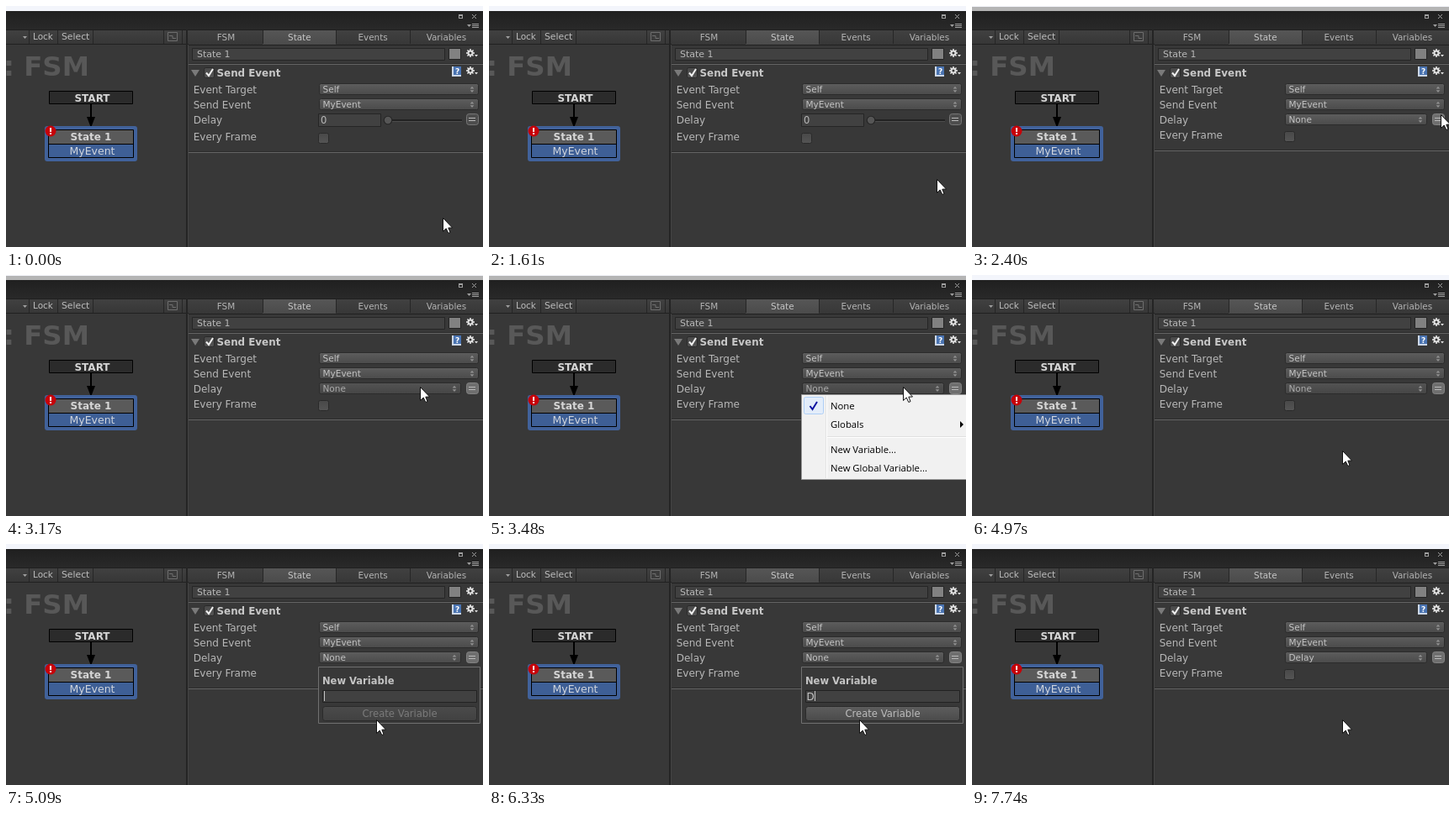
An HTML page with a canvas that plays this animation: 567 by 287 pixels, repeating every 8000 ms.

```html
<!DOCTYPE html>
<html lang="en">
<head>
<meta charset="utf-8">
<title>State inspector</title>
<style>
  html, body { margin: 0; width: 100%; height: 100%; overflow: hidden; background: #383838; }
  canvas { display: block; width: 567px; height: 287px; }
</style>
</head>
<body>
<canvas id="stage"></canvas>
<script>
const W = 567, H = 287, LOOP = 8000;
const canvas = document.getElementById('stage');
const ctx = canvas.getContext('2d');
const dpr = window.devicePixelRatio || 1;
canvas.width = W * dpr;
canvas.height = H * dpr;

const UI = '"DejaVu Sans", sans-serif';
const MENU = '"Open Sans", "Noto Sans", sans-serif';

// [time, x, y] of the pointer's top left corner
const pointerPath = [
  [0, 519, 252], [1470, 521, 248], [1610, 532, 206], [1730, 544, 160],
  [1880, 556, 136], [2030, 557, 129], [2680, 540, 131], [2800, 508, 133],
  [2920, 492, 133], [3780, 480, 161], [3905, 452, 192], [4030, 440, 210],
  [4170, 440, 213], [4420, 440, 211], [4570, 440, 209]
];
// [time, typed text]
const typing = [[5090, ''], [6330, 'D'], [6580, 'Del'], [6730, 'Dela'], [7290, 'Delay']];

const at = (list, t) => list.reduce((cur, step) => step[0] <= t ? step : cur, list[0]);
const within = (t, a, b) => t >= a && t < b;

function rect(x, y, w, h, fill) {
  ctx.fillStyle = fill;
  ctx.fillRect(x, y, w, h);
}

function shade(y, h, top, bottom) {
  const g = ctx.createLinearGradient(0, y, 0, y + h);
  g.addColorStop(0, top);
  g.addColorStop(1, bottom);
  return g;
}

function box(x, y, w, h, fill, line, r = 0) {
  ctx.beginPath();
  ctx.roundRect(x + .5, y + .5, w - 1, h - 1, r);
  ctx.fillStyle = fill;
  ctx.fill();
  ctx.strokeStyle = line;
  ctx.lineWidth = 1;
  ctx.stroke();
}

function poly(points, fill) {
  ctx.beginPath();
  points.forEach(([x, y]) => ctx.lineTo(x, y));
  ctx.closePath();
  ctx.fillStyle = fill;
  ctx.fill();
}

function line(points, color, width) {
  ctx.beginPath();
  points.forEach(([x, y]) => ctx.lineTo(x, y));
  ctx.strokeStyle = color;
  ctx.lineWidth = width;
  ctx.stroke();
}

function disc(x, y, r, fill) {
  ctx.beginPath();
  ctx.arc(x, y, r, 0, Math.PI * 2);
  ctx.fillStyle = fill;
  ctx.fill();
}

function text(s, x, y, size, color, { bold = false, align = 'left', font = UI } = {}) {
  ctx.font = `${bold ? 'bold ' : ''}${size}px ${font}`;
  ctx.textAlign = align;
  ctx.fillStyle = color;
  ctx.fillText(s, x, y);
}

function gear(x, y) {
  for (let i = 0; i < 8; i++) {
    const a = i * Math.PI / 4, c = Math.cos(a), s = Math.sin(a);
    line([[x + c * 2.5, y + s * 2.5], [x + c * 5, y + s * 5]], '#e2e2e2', 1.6);
  }
  disc(x, y, 3.5, '#e2e2e2');
  disc(x, y, 1.5, '#383838');
  poly([[x + 5, y + 2], [x + 9, y + 2], [x + 7, y + 4.5]], '#e2e2e2');
}

function popup(y, w, label, dim) {
  const fill = dim ? shade(y, 14, '#545454', '#454545') : shade(y, 14, '#5e5e5e', '#4a4a4a');
  box(372, y, w, 14, fill, '#2b2b2b', 2);
  text(label, 376.5, y + 11, 10.5, dim ? '#adadad' : '#c4c4c4');
  const x = 372 + w - 8;
  poly([[x - 2.3, y + 6.5], [x + 2.3, y + 6.5], [x, y + 3.8]], '#929292');
  poly([[x - 2.3, y + 8.3], [x + 2.3, y + 8.3], [x, y + 11]], '#929292');
}

function checkbox(x, y) {
  box(x, y, 13, 13, shade(y, 13, '#484848', '#555'), '#2a2a2a', 2);
}

function divider(y) {
  rect(217, y, 350, 1, '#2c2c2c');
  rect(217, y + 1, 350, 1, '#656565');
}

function windowFrame(t) {
  rect(0, 0, W, H, '#383838');
  rect(0, 0, W, 6, '#f3f5fb');
  if (within(t, 2400, 4970)) rect(0, 1, W, 5, '#b4b4b4');
  rect(0, 6, W, 22, shade(6, 22, '#202020', '#292929'));

  ctx.strokeStyle = '#a0a0a0';
  ctx.lineWidth = 1;
  ctx.strokeRect(538.5, 10.5, 4, 4);
  rect(538, 10, 5, 2, '#a0a0a0');
  line([[554, 10], [559, 15]], '#a0a0a0', 1);
  line([[559, 10], [554, 15]], '#a0a0a0', 1);
  poly([[548, 22], [553, 22], [550.5, 25]], '#a0a0a0');
  for (let y = 21; y < 26; y += 2) rect(554, y, 8, 1, '#a0a0a0');

  rect(0, 28, 217, 17, shade(28, 17, '#414141', '#373737'));
  rect(217, 29, 350, 17, shade(29, 17, '#414141', '#373737'));
  rect(305, 29, 87, 17, shade(29, 17, '#565656', '#4b4b4b'));
  rect(0, 28, W, 1, '#1f1f1f');
  rect(0, 45, 217, 1, '#202020');
  rect(217, 46, 350, 1, '#202020');
  [27, 61, 103, 187, 209, 305, 392, 480].forEach(x => rect(x, 29, 1, 16, '#262626'));
  poly([[20, 36], [25, 36], [22.5, 39]], '#a0a0a0');
  text('Lock', 32, 40, 10.5, '#bdbdbd');
  text('Select', 66, 40, 10.8, '#bdbdbd');
  box(192, 31, 12, 11, '#3b3b3b', '#6e6e6e');
  line([[194, 35.5], [198, 35.5], [198, 38.5], [202, 38.5]], '#6e6e6e', 1);
  ['FSM', 'State', 'Events', 'Variables'].forEach((s, i) =>
    text(s, 261.5 + i * 87.3, 41, 10.4, i === 1 ? '#c6c6c6' : '#b4b4b4', { align: 'center' }));
}

function graph() {
  text(': FSM', -3, 83, 32.4, '#585858', { bold: true });
  box(51, 101, 100, 16, '#2b2b2b', '#000');
  text('START', 102.5, 114, 12, '#d6d6d6', { bold: true, align: 'center' });
  rect(100, 117, 2, 16, '#000');
  poly([[96, 132], [106, 132], [101, 145]], '#000');

  ctx.beginPath();
  ctx.roundRect(46, 143, 110, 42, 3);
  ctx.fillStyle = '#41629b';
  ctx.fill();
  box(50, 147, 102, 34, '#3e5f96', '#000');
  rect(51, 148, 100, 16, '#5a5a5a');
  rect(51, 164, 100, 1, '#000');
  text('State 1', 101, 160, 12, '#d6d6d6', { bold: true, align: 'center' });
  text('MyEvent', 102.5, 177, 12.5, '#d0d5dd', { align: 'center' });

  disc(53, 149, 6.5, '#c70008');
  rect(52, 145, 2, 5, '#fff');
  rect(52, 151, 2, 2, '#fff');

  rect(214, 28, 2, 259, '#242424');
  rect(216, 46, 1, 241, '#444');
}

function stateHeader() {
  box(221, 50, 301, 15, '#414141', '#252525');
  text('State 1', 227, 61, 11, '#b8b8b8');
  box(526, 50, 15, 14, '#818181', '#242424');
  gear(552, 56);
  divider(68);

  poly([[220, 76], [230, 76], [225, 84]], '#7a7a7a');
  checkbox(235, 73);
  line([[238, 79.5], [241, 83], [246, 75]], '#f0f0f0', 2);
  text('Send Event', 250.5, 84, 11.9, '#c8c8c8', { bold: true });
  rect(530, 72, 11, 12, '#cdd8e8');
  rect(532, 72, 9, 10, '#4a74b2');
  text('?', 536.5, 80.5, 9, '#fff', { bold: true, align: 'center' });
  gear(552, 77);
}

function fields(t) {
  const ink = '#b8b8b8';
  const linked = t >= 2400;
  text('Event Target', 222.7, 104, 12, ink);
  popup(92, 190, 'Self', false);
  text('Send Event', 222.7, 122, 12, ink);
  popup(110, 190, 'MyEvent', false);
  text('Delay', 222.7, 140, 12, ink);

  if (linked) {
    popup(128, 169, t < 7740 ? 'None' : 'Delay', within(t, 3170, 5090));
  } else {
    box(371, 128, 75, 16, '#414141', '#252525');
    text('0', 374, 140, 11.5, ink);
    rect(449, 135, 93, 2, '#222');
    rect(449, 137, 93, 1, '#4c4c4c');
    disc(454, 136, 5.3, '#262626');
    disc(454, 136, 4.2, '#565656');
  }
  box(547, 128, 15, 14, linked ? '#6f6f6f' : '#4d4d4d', linked ? '#828282' : '#767676', 3);
  rect(550, 133, 8, 1, '#b8b8b8');
  rect(550, 136, 8, 1, '#b8b8b8');

  const shift = linked ? 0 : 2;
  text('Every Frame', 222.7, 158 + shift, 12, ink);
  checkbox(371, 149 + shift);
  divider(171 + shift);
}

function hoverRow(y) {
  box(374, y, 200, 21, shade(y, 21, '#f1f4f8', '#e6eef8'), '#aecff7', 2);
}

function menu(t) {
  box(371, 142, 200, 102, '#f1f1f1', '#979797');
  rect(400, 144, 1, 98, '#e2e3e3');
  rect(401, 144, 1, 98, '#fff');
  rect(402, 192, 165, 1, '#e0e0e0');
  rect(402, 193, 165, 1, '#fff');
  if (within(t, 3780, 3905)) hoverRow(145);
  if (within(t, 3905, 4030)) hoverRow(167);
  if (t >= 4030) hoverRow(197);
  box(374, 145, 24, 21, '#e3edfa', '#aecff7', 2);
  line([[381.5, 156], [384.5, 160], [390, 151]], '#0c12a1', 2);
  [['None', 160], ['Globals', 182], ['New Variable...', 212], ['New Global Variable...', 234]]
    .forEach(([s, y]) => text(s, 406, y, 11.3, '#000', { font: MENU }));
  poly([[560, 174], [564, 178], [560, 182]], '#000');
}

function variableDialog(t) {
  const typed = at(typing, t)[1];
  const face = typed ? shade(193, 18, '#5e5e5e', '#4a4a4a') : shade(193, 18, '#4b4b4b', '#414141');
  box(371, 146, 193, 68, '#383838', '#707070');
  text('New Variable', 376, 167, 11.5, '#c4c4c4', { bold: true });
  box(376, 174, 184, 15, '#414141', '#222');
  text(typed, 377.5, 186, 12, '#c4c4c4');
  ctx.font = `12px ${UI}`;
  rect(Math.round(377.5 + ctx.measureText(typed).width), 175, 1, 12, '#c4c4c4');
  box(376, 193, 184, 18, face, '#2b2b2b', 3);
  text('Create Variable', 468, 205.5, 11.6, typed ? '#bdbdbd' : '#7b7b7b', { align: 'center' });
}

function pointer(x, y) {
  const shape = [[.5, .5], [.5, 16.5], [4.2, 13], [6.8, 18.5], [9, 17.6], [6.8, 12.2], [11.5, 12]];
  ctx.save();
  ctx.translate(x, y);
  poly(shape, '#fff');
  ctx.strokeStyle = '#111';
  ctx.lineWidth = 1;
  ctx.lineJoin = 'round';
  ctx.stroke();
  ctx.restore();
}

function draw(t) {
  ctx.setTransform(dpr, 0, 0, dpr, 0, 0);
  windowFrame(t);
  graph();
  stateHeader();
  fields(t);
  if (within(t, 3480, 4970)) menu(t);
  if (within(t, 5090, 7740)) variableDialog(t);
  const [, x, y] = at(pointerPath, t);
  pointer(x, y);
}

const start = performance.now();
function tick() {
  draw((performance.now() - start) % LOOP);
  requestAnimationFrame(tick);
}
tick();
</script>
</body>
</html>
```
